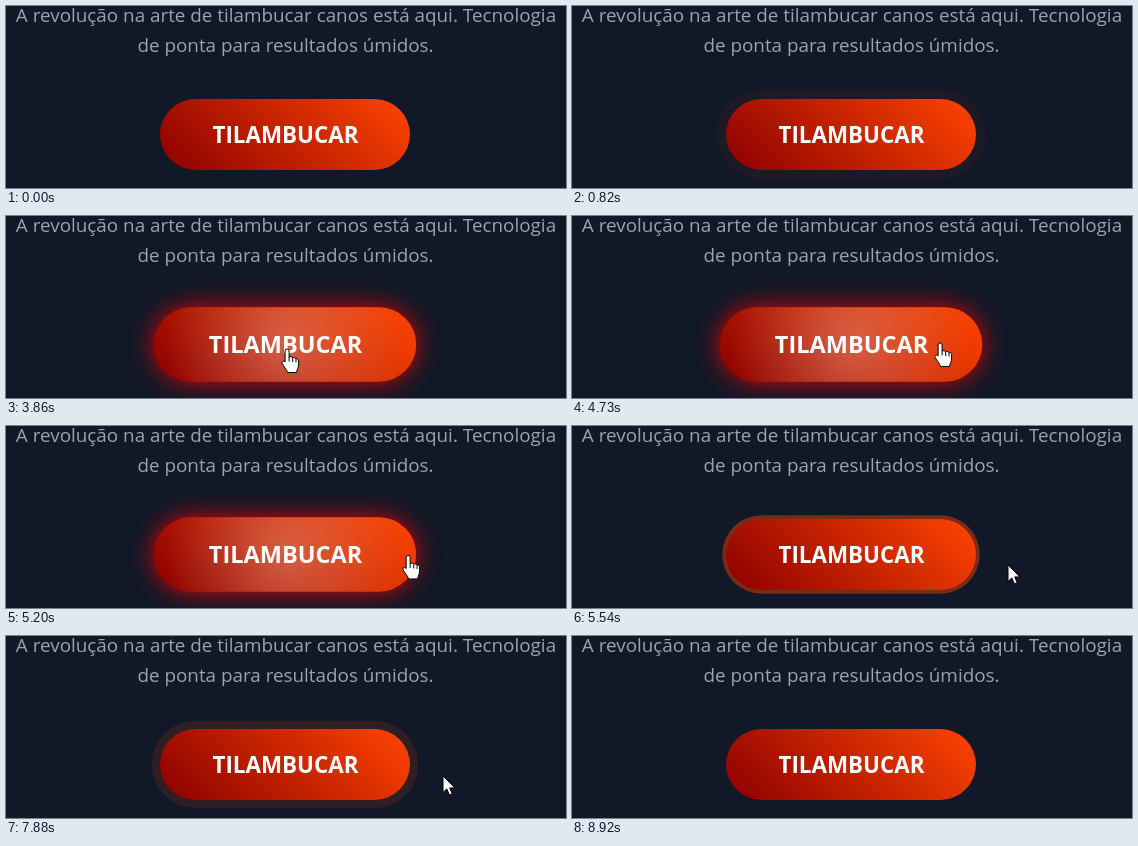
These frames come from a looping animation (560x182 px, 9.37 s). An HTML page:

```html
<!DOCTYPE html>
<html lang="pt">
<head>
<meta charset="utf-8">
<style>
html, body { margin: 0; width: 100%; height: 100%; overflow: hidden; background: #111827; }
svg { display: block; width: 100vw; height: 100vh; }
text { font-family: "Open Sans", "Noto Sans", sans-serif; text-anchor: middle; }
.lead { font-size: 18.85px; fill: #9ca3af; }
.label { font-size: 22.4px; font-weight: 700; fill: #fff; }
</style>
</head>
<body>
<svg viewBox="0 0 560 182">
  <defs>
    <linearGradient id="fire" gradientUnits="userSpaceOnUse" x1="198.75" y1="208.75" x2="359.25" y2="48.25">
      <stop offset="0" stop-color="#8b0000"/>
      <stop offset="1" stop-color="#ff4500"/>
    </linearGradient>
    <radialGradient id="shine" gradientUnits="userSpaceOnUse" cx="279" cy="128.5" r="115">
      <stop offset="0" stop-color="#fff" stop-opacity=".27"/>
      <stop offset="1" stop-color="#fff" stop-opacity="0"/>
    </radialGradient>
    <filter id="blur" filterUnits="userSpaceOnUse" x="90" y="30" width="380" height="200">
      <feGaussianBlur stdDeviation="11.5"/>
    </filter>
  </defs>
  <rect width="560" height="182" fill="#111827"/>
  <g id="button">
    <rect id="glow" x="154" y="93" width="250" height="71" rx="35.5" fill="#ff0a00" filter="url(#blur)"/>
    <rect id="ring" fill="#ff4500"/>
    <rect x="154" y="93" width="250" height="71" rx="35.5" fill="url(#fire)"/>
    <rect id="light" x="154" y="93" width="250" height="71" rx="35.5" fill="url(#shine)"/>
    <text class="label" x="279.5" y="137">TILAMBUCAR</text>
  </g>
  <text class="lead" x="280" y="16">A revolução na arte de tilambucar canos está aqui. Tecnologia</text>
  <text class="lead" x="279.5" y="46">de ponta para resultados úmidos.</text>
  <g id="cursor" fill="#fff" stroke="#000" stroke-linejoin="round">
    <path id="arrow" d="M0 0V16.5l3.8-3.6 2.6 6 2.8-1.2-2.5-5.8h5.3z"/>
    <g id="hand">
      <path d="M-2 2a2 2 0 0 1 4 0v6.2c.8-.9 3.2-.7 3.6.7.9-.8 3-.5 3.3 1 1-.6 2.6 0 2.6 1.7V16c0 2.6-1.6 4-2 7.5h-9c-1-3-3.5-5.5-5.4-8.8-1-2 1.2-3.6 2.9-1.7z"/>
      <path fill="none" d="M2 8v4.5M5.6 9v4M8.9 10v3.5"/>
    </g>
  </g>
</svg>
<script>
const LOOP = 9370, HOVER_IN = 2425, HOVER_OUT = 5345;
const FIRST_PULSE = 125, PERIOD = 2000, GROW = 1000;
const SHOWN = 2110, GONE = 8900;
// time, x, y of the pointer tip
const PATH = [
  [2110, 297, 181], [2430, 286, 151], [2900, 281, 133], [3860, 281, 133],
  [4400, 332, 129], [4730, 368, 127], [4790, 374, 125], [5345, 412, 131],
  [5540, 436, 139], [5740, 437, 140], [8620, 437, 140], [8900, 440, 183]
];

const $ = id => document.getElementById(id);
const clamp = v => Math.max(0, Math.min(1, v));
const set = (el, attrs) => { for (const k in attrs) el.setAttribute(k, attrs[k]); };

// CSS "ease": cubic-bezier(.25, .1, .25, 1)
function ease(x) {
  if (x <= 0 || x >= 1) return clamp(x);
  let lo = 0, hi = 1, u = .5;
  for (let i = 0; i < 20; i++) {
    u = (lo + hi) / 2;
    const bx = .75 * u * (1 - u) + u ** 3;
    if (bx < x) lo = u; else hi = u;
  }
  return .3 * u * (1 - u) ** 2 + 3 * u * u * (1 - u) + u ** 3;
}

function pointerAt(t) {
  let i = 1;
  while (i < PATH.length - 1 && t > PATH[i][0]) i++;
  const [t0, x0, y0] = PATH[i - 1], [t1, x1, y1] = PATH[i];
  const p = clamp((t - t0) / (t1 - t0));
  return [x0 + (x1 - x0) * p, y0 + (y1 - y0) * p];
}

function drawRing(t, hovered) {
  const start = t >= HOVER_OUT ? HOVER_OUT : FIRST_PULSE;
  const age = (t - start) % PERIOD;
  const p = 1 - (1 - clamp(age / GROW)) ** 2.2;
  const s = 10 * p;
  const on = !hovered && t >= start;
  set($('ring'), {
    x: 154 - s, y: 93 - s, width: 250 + 2 * s, height: 71 + 2 * s,
    rx: 35.5 + s, opacity: on ? .7 * (1 - p) : 0
  });
}

function render(t) {
  const hovered = t >= HOVER_IN && t < HOVER_OUT;
  const h = t < HOVER_OUT ? ease((t - HOVER_IN) / 300) : 1 - ease((t - HOVER_OUT) / 200);

  drawRing(t, hovered);
  set($('button'), { transform: `translate(279 128.5) scale(${1 + .05 * h}) translate(-279 -128.5)` });
  set($('glow'), { opacity: hovered ? .85 * h : 0 });
  set($('light'), { opacity: h });

  const [x, y] = pointerAt(t);
  set($('cursor'), {
    transform: `translate(${x} ${y})`,
    visibility: t >= SHOWN && t < GONE ? 'visible' : 'hidden'
  });
  set($('arrow'), { display: hovered ? 'none' : 'inline' });
  set($('hand'), { display: hovered ? 'inline' : 'none' });
}

const begin = performance.now();
function tick() {
  render((performance.now() - begin) % LOOP);
  requestAnimationFrame(tick);
}
tick();
</script>
</body>
</html>
```
